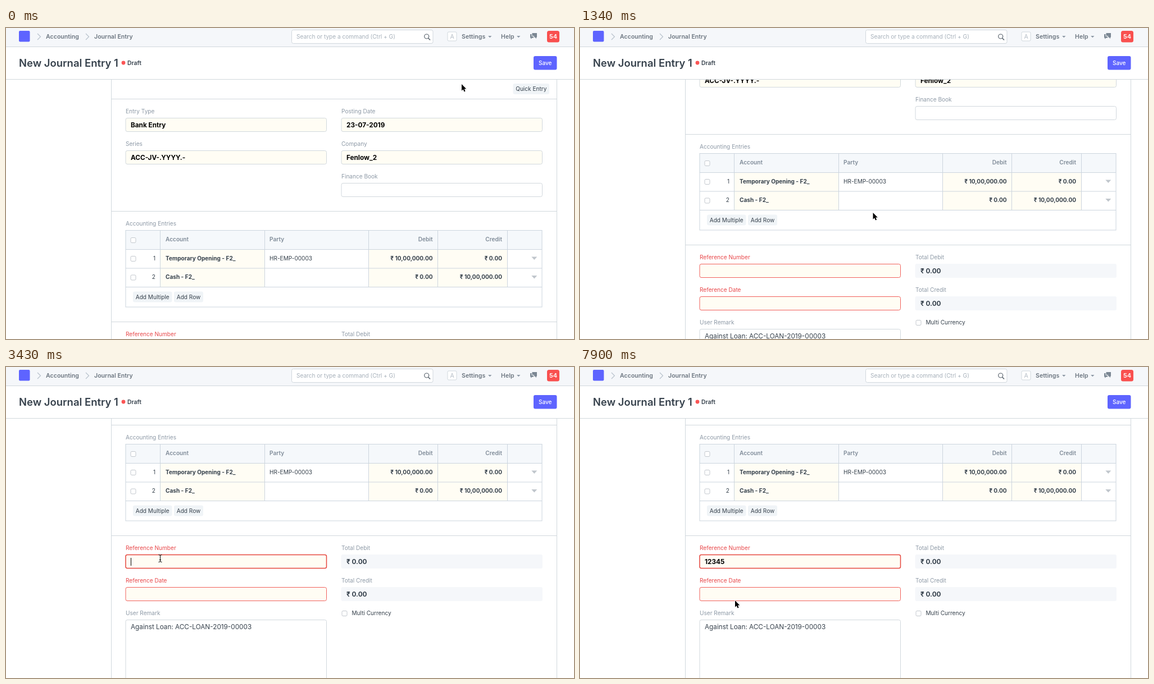
Animation, 1011 px wide and 554 px high, one loop 8 s. Source, as an HTML page:

```html
<!DOCTYPE html>
<html lang="en">
<head>
<meta charset="utf-8">
<title>Journal entry form</title>
<style>
  html, body { margin: 0; width: 100%; height: 100%; overflow: hidden; background: #fff; }
  svg { display: block; font-family: Inter, sans-serif; }
  text { white-space: pre; }
</style>
</head>
<body>
<svg id="stage" width="1011" height="554" viewBox="0 0 1011 554"></svg>
<script>
const LOOP = 8000;
const SMALL = 10.08, LARGE = 11.76;
const INK = '#36414c', MUTED = '#8d99a6', LINE = '#d1d8dd', GRID = '#ccd5de';
const CREAM = '#fffdf4', PALE = '#f5f7fa', RED = '#e8484a', VIOLET = '#5e64ff';

function add(parent, tag, attrs, content) {
  const node = document.createElementNS('http://www.w3.org/2000/svg', tag);
  for (const key in attrs) node.setAttribute(key, attrs[key]);
  if (content !== undefined) node.textContent = content;
  return parent.appendChild(node);
}

// Text is placed by the vertical centre of its capitals.
const label = (parent, x, mid, content, { size = SMALL, weight = 400, fill = MUTED, anchor = 'start' } = {}) =>
  add(parent, 'text', { x, y: mid + size * 0.36, 'font-size': size, 'font-weight': weight, fill, 'text-anchor': anchor }, content);

// Filled box; a border is drawn inside the given edges.
function box(parent, x, y, width, height, fill, { stroke, rx = 0 } = {}) {
  const inset = stroke ? 0.5 : 0;
  return add(parent, 'rect', {
    x: x + inset, y: y + inset, width: width - 2 * inset, height: height - 2 * inset,
    rx, fill, stroke: stroke || 'none'
  });
}

const path = (parent, d, attrs) => add(parent, 'path', { d, fill: 'none', ...attrs });
const hLine = (parent, y, x1, x2, stroke = LINE) => path(parent, `M${x1} ${y}H${x2}`, { stroke });
const triangle = (parent, x, y, half, height, fill) =>
  path(parent, `M${x - half} ${y}h${2 * half}l${-half} ${height}z`, { fill });
const checkbox = (parent, x, y) => box(parent, x, y, 10, 10, '#fff', { stroke: '#c3c8ce', rx: 2 });

function button(parent, x, y, width, content) {
  box(parent, x, y, width, 19, '#f0f4f7', { rx: 3 });
  label(parent, x + width / 2, y + 9.5, content, { fill: INK, anchor: 'middle' });
}

function field(parent, x, top, name, value = '', { fill = CREAM, stroke = LINE, color = MUTED, shift = 0 } = {}) {
  label(parent, x, top - 11.5, name, { fill: color });
  const frame = box(parent, x - 0.5, top, 358.5, 25, fill, { stroke, rx: 3 });
  label(parent, x + 9, top + 12.5 + shift, value, { size: LARGE, weight: 700, fill: stroke ? '#000' : INK });
  return frame;
}

const stage = document.getElementById('stage');
const form = add(stage, 'g', {});
const LEFT = 213, RIGHT = 597;

path(form, 'M187.5 0V900M980.5 0V900', { stroke: LINE });
[126.5, 326.5, 523.5].forEach(y => hLine(form, y, 187, 981));
button(form, 902.5, 99, 64.5, 'Quick Entry');

field(form, LEFT, 160, 'Entry Type', 'Bank Entry');
field(form, LEFT, 218, 'Series', 'ACC-JV-.YYYY.-');
field(form, RIGHT, 160, 'Posting Date', '23-07-2019', { shift: 0.7 });
field(form, RIGHT, 218, 'Company', 'Fenlow_2', { shift: 0.7 });
field(form, RIGHT, 276, 'Finance Book', '', { fill: '#fff' });

// Accounting table
label(form, LEFT, 348.5, 'Accounting Entries');
box(form, 212.5, 360, 742, 34, '#f5f8fb');
[[274.5, 185.5], [645, 123.5], [768.5, 123.5]].forEach(([x, width]) => box(form, x, 394, width, 67, CREAM));
[394, 427.5, 461].forEach(y => hLine(form, y + 0.5, 213, 954, GRID));
path(form, 'M274.5 360V461M460.5 360V461M645.5 360V461M768.5 360V461M892.5 360V461', { stroke: GRID });
box(form, 212.5, 360, 742, 137.5, 'none', { stroke: GRID });

const heading = { weight: 600, fill: '#7f8b98' };
checkbox(form, 221.5, 373);
label(form, 284, 376.5, 'Account', heading);
label(form, 469, 376.5, 'Party', heading);
label(form, 759.5, 376.5, 'Debit', { ...heading, anchor: 'end' });
label(form, 883, 376.5, 'Credit', { ...heading, anchor: 'end' });

[
  ['Temporary Opening - F2_', 'HR-EMP-00003', '₹ 10,00,000.00', '₹ 0.00'],
  ['Cash - F2_', '', '₹ 0.00', '₹ 10,00,000.00']
].forEach(([account, party, debit, credit], i) => {
  const mid = 410 + i * 33.5, bold = { weight: 700, fill: INK };
  checkbox(form, 221.5, mid - 4);
  label(form, 266, mid, i + 1, { fill: INK, anchor: 'end' });
  label(form, 284, mid, account, bold);
  label(form, 469, mid, party, { fill: INK });
  label(form, 759.5, mid, debit, { ...bold, anchor: 'end' });
  label(form, 883, mid, credit, { ...bold, anchor: 'end' });
  triangle(form, 940.3, mid - 2.5, 5, 5.5, '#c0c6cc');
});
button(form, 226, 469.5, 69.5, 'Add Multiple');
button(form, 299, 469.5, 52, 'Add Row');

// Reference section
const required = { stroke: '#f0605c', color: RED };
const reference = field(form, LEFT, 557, 'Reference Number', '', required);
field(form, LEFT, 615, 'Reference Date', '', required);
label(form, LEFT, 661.5, 'User Remark');
box(form, 212.5, 673, 358.5, 250, '#fff', { stroke: LINE, rx: 3 });
label(form, 222, 685.5, 'Against Loan: ACC-LOAN-2019-00003', { size: LARGE, fill: INK });
field(form, RIGHT, 557, 'Total Debit', '₹ 0.00', { fill: PALE, stroke: '' });
field(form, RIGHT, 615, 'Total Credit', '₹ 0.00', { fill: PALE, stroke: '' });
checkbox(form, 597.5, 657);
label(form, 615.5, 661.7, 'Multi Currency', { fill: INK });
const typed = label(form, 222, 570, '', { size: LARGE, weight: 700, fill: '#000' });
const caret = box(form, 222, 563, 1, 14, '#000');

// Fixed navigation bar and page title
const head = add(stage, 'g', {});
box(head, 0, 0, 1011, 92, '#fff');
box(head, 0, 0, 1011, 33, PALE);
hLine(head, 33.5, 0, 1011);
hLine(head, 91.5, 0, 1011);
box(head, 23, 5, 19.5, 19.5, VIOLET, { rx: 2 });
const navText = { size: 10.6, weight: 600, fill: '#6c7680' };
[56, 142].forEach(x => path(head, `M${x} 10l5.5 5.5l-5.5 5.5`, { stroke: '#b8c2cc', 'stroke-width': 1.2 }));
label(head, 71, 15.5, 'Accounting', navText);
label(head, 157, 15.5, 'Journal Entry', navText);
box(head, 508, 3, 252.5, 25, '#fff', { stroke: LINE, rx: 3 });
label(head, 517, 15.5, 'Search or type a command (Ctrl + G)', { fill: '#a6b0ba' });
add(head, 'circle', { cx: 748.7, cy: 15, r: 4, fill: 'none', stroke: '#59636d', 'stroke-width': 1.2 });
path(head, 'M751.6 18l3.4 3.5', { stroke: '#59636d', 'stroke-width': 1.6 });
box(head, 785.5, 6.5, 17, 17, '#fff', { stroke: LINE, rx: 2 });
label(head, 794, 15.2, 'A', { size: 10.5, fill: '#b4bdc6', anchor: 'middle' });
label(head, 811, 15, 'Settings', navText);
triangle(head, 861.3, 14, 3.2, 3.2, MUTED);
label(head, 881, 15, 'Help', navText);
triangle(head, 912.3, 14, 3.2, 3.2, MUTED);
path(head, 'M936.5 9H945V16.5H944V19L941.5 16.5H940V14H936.5Z', { fill: '#7b8793' });
path(head, 'M933 11H935.5V15H939V17.5H936.5L934.3 19.7V17.5H933Z', { fill: '#7b8793' });
box(head, 963, 5, 22, 20.5, '#f9504f', { rx: 3.5 });
label(head, 974, 15.2, '54', { size: 11, weight: 600, fill: '#fff', anchor: 'middle' });
label(head, 23, 62, 'New Journal Entry 1', { size: 18.48, weight: 600, fill: INK });
add(head, 'circle', { cx: 209, cy: 62, r: 3.4, fill: '#fb5555' });
label(head, 216, 62, 'Draft', { size: 10.4, weight: 600, fill: INK });
box(head, 939, 50, 41.5, 24.5, VIOLET, { rx: 3 });
label(head, 959.7, 62, 'Save', { weight: 500, fill: '#fff', anchor: 'middle' });

// Mouse pointers, both with their hot spot at 0,0
const arrow = path(stage, 'M0 0V11.7L2.7 9.3L4.5 13.4L6.6 12.5L4.8 8.5H8.3Z',
  { fill: '#000', stroke: '#fff', 'stroke-width': 1, 'paint-order': 'stroke' });
const beam = path(stage, 'M-3 -6.5Q0 -6.5 0 -5Q0 -6.5 3 -6.5M0 -5V5M-3 6.5Q0 6.5 0 5Q0 6.5 3 6.5M-1.5 2.5H1.5',
  { stroke: '#000' });

// Each track holds [start time, ...values] and changes in hard steps.
const POINTER = [
  [0, 811, 100], [150, 760, 94], [300, 590, 210], [440, 390, 330], [590, 295, 362], [740, 521.5, 329],
  [1630, 440, 333], [1780, 340, 338, true], [1930, 285, 341, true], [2080, 274.5, 341, true],
  [7760, 279, 430], [7900, 276, 416]
];
const SCROLL = [[0, 0], [1190, 16], [1340, 137], [1480, 223]];
const CARET = [
  [0, false], [2530, true], [2980, false], [3430, true], [4030, false],
  [4480, true], [4930, false], [5530, true], [7620, false]
];
const TYPED = [[0, 0], [5980, 1], [6120, 2], [6420, 3], [6870, 4], [7170, 5]];
const at = (track, time) => track.findLast(([start]) => start <= time).slice(1);

function draw() {
  const time = performance.now() % LOOP;
  const [x, y, overText] = at(POINTER, time);
  const focused = time >= 2530;

  form.setAttribute('transform', `translate(0 ${-at(SCROLL, time)[0]})`);
  for (const [pointer, visible] of [[arrow, !overText], [beam, overText]]) {
    pointer.setAttribute('transform', `translate(${x} ${y})`);
    pointer.setAttribute('visibility', visible ? 'visible' : 'hidden');
  }
  reference.setAttribute('stroke', focused ? '#e5473f' : required.stroke);
  reference.setAttribute('stroke-width', focused ? 1.5 : 1);
  typed.textContent = '12345'.slice(0, at(TYPED, time)[0]);
  caret.setAttribute('x', Math.round(222 + typed.getComputedTextLength()));
  caret.setAttribute('visibility', at(CARET, time)[0] ? 'visible' : 'hidden');
  requestAnimationFrame(draw);
}
draw();
</script>
</body>
</html>
```
